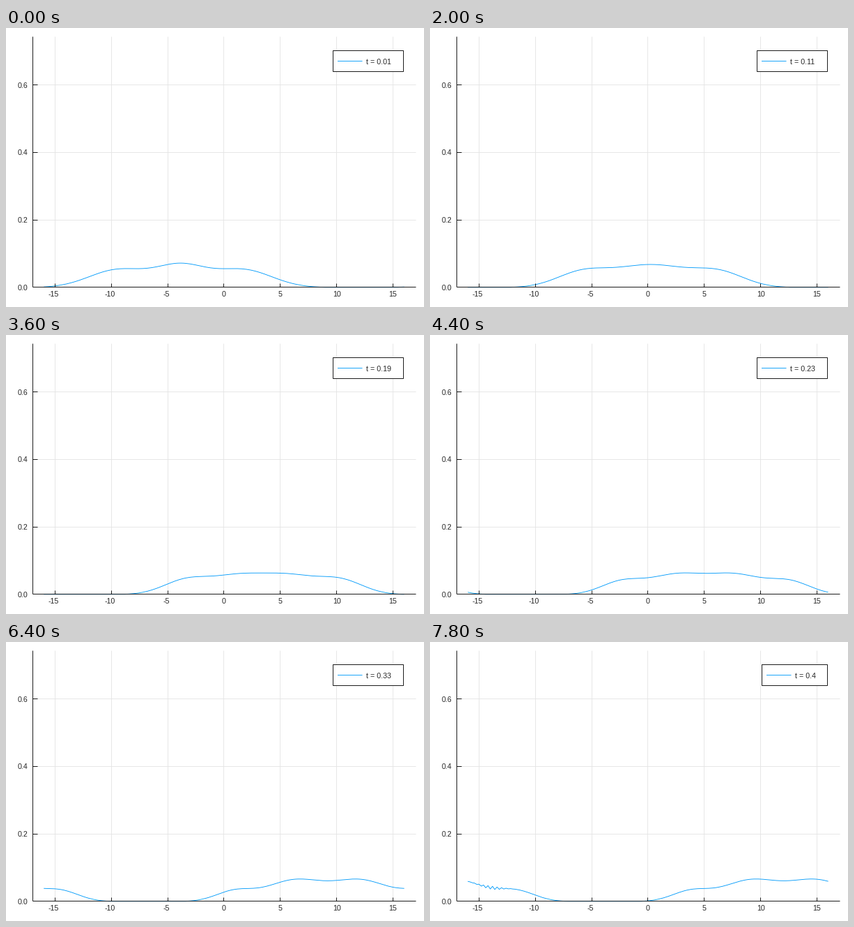
A matplotlib script for the animation above (8 s loop, 600x400 px).

```python
import numpy as np
import matplotlib.pyplot as plt
from matplotlib.animation import FuncAnimation
from matplotlib.patches import Rectangle

W, H, DPI = 600, 400, 100
FRAMES, STEP_MS = 40, 200
PT = 72 / DPI                      # points per pixel
LINE = 0.88 * PT
LEFT, RIGHT, TOP, BASE = 38, 588, 12, 371.3
X0, X_UNIT, Y_UNIT = 312.9, 16.17, 484
BLUE, INK, GRID = "#009afa", "#000000", "#e4e4e4"
FONT = dict(family="Liberation Sans", size=10.67 * PT, color="#262626",
            va="baseline")


def px(x):
    return X0 + X_UNIT * x


def mix(a, b, w):
    return a + (b - a) * w


def pair(u, pos, width, area):
    """Two equal Gaussians at +pos and -pos."""
    bumps = [np.exp(-((u - s * pos) / width) ** 2 / 2) for s in (-1, 1)]
    return area / width * sum(bumps)


cell = np.arange(161)
xs = -16 + 0.2 * cell


def packet(t):
    """Height in pixels of the wave packet on its periodic domain."""
    centre = -3.865 + 40.83 * (t - 0.01)
    u = ((xs - centre + 16) % 32 - 16) * X_UNIT
    # weight flows from the outer bumps to the inner pair as it splits
    f = min((t - 0.01) / 0.31, 1)
    w = f * f * (3 - 2 * f)
    h = pair(u, 48 * w ** 0.5, mix(36, 40.5, w), mix(545, 1220, w))
    h += pair(u, mix(90, 134, w ** 1.5), mix(41.5, 27, w), mix(1055, 385, w))
    # grid-scale ripple that grows near the end
    amp = 2.2 * np.exp((t - 0.4) / 0.012)
    h -= amp * (-1.0) ** cell * np.exp(-((xs + 13.9) / 0.75) ** 2 / 2)
    return np.maximum(h - 0.5, 0)


fig = plt.figure(figsize=(W / DPI, H / DPI), dpi=DPI, facecolor="white")
ax = fig.add_axes([0, 0, 1, 1])
ax.set_xlim(0, W)
ax.set_ylim(H, 0)
ax.axis("off")


def stroke(x, y, color, z, snap=True):
    return ax.plot(x, y, color=color, lw=LINE, zorder=z, snap=snap,
                   solid_capstyle="butt")[0]


for v in range(-15, 16, 5):
    x = round(px(v) - 0.5)
    stroke([x, x], [TOP, BASE], GRID, 1)
    stroke([x, x], [BASE, BASE - 5.5], INK, 4)
    ax.text(px(v) - (2 if v < 0 else 0), 385, str(v), ha="center", **FONT)
for v in (0, 0.2, 0.4, 0.6):
    y = BASE - Y_UNIT * v
    if v:
        stroke([LEFT, RIGHT], [y, y], GRID, 1)
        stroke([LEFT, LEFT + 7], [y, y], INK, 4)
    ax.text(31.8, y + 4.7, f"{v:.1f}", ha="right", **FONT)
stroke([LEFT, RIGHT], [BASE, BASE], INK, 4)
stroke([LEFT, LEFT], [TOP, BASE], INK, 4)

curve = stroke(px(xs), xs, BLUE, 3, snap=False)
box = ax.add_patch(Rectangle((469, 32), 101, 30, fc="white", ec=INK,
                             lw=LINE, zorder=5, snap=True))
key = stroke([476, 511.5], [47.5, 47.5], BLUE, 6, snap=False)
label = ax.text(517, 52, "", zorder=6, **FONT)


def draw(k):
    t = round(0.01 * (k + 1), 2)
    curve.set_ydata(BASE + 0.4 - packet(t))
    name = f"t = {t}"
    shift = 7 if len(name) < 8 else 0
    box.set_x(469 + shift)
    box.set_width(101 - shift)
    key.set_xdata([476 + shift, 511.5 + shift])
    label.set_x(517 + shift)
    label.set_text(name)
    return curve, box, key, label


anim = FuncAnimation(fig, draw, frames=FRAMES, interval=STEP_MS,
                     repeat=True, repeat_delay=0)
plt.show()
```
